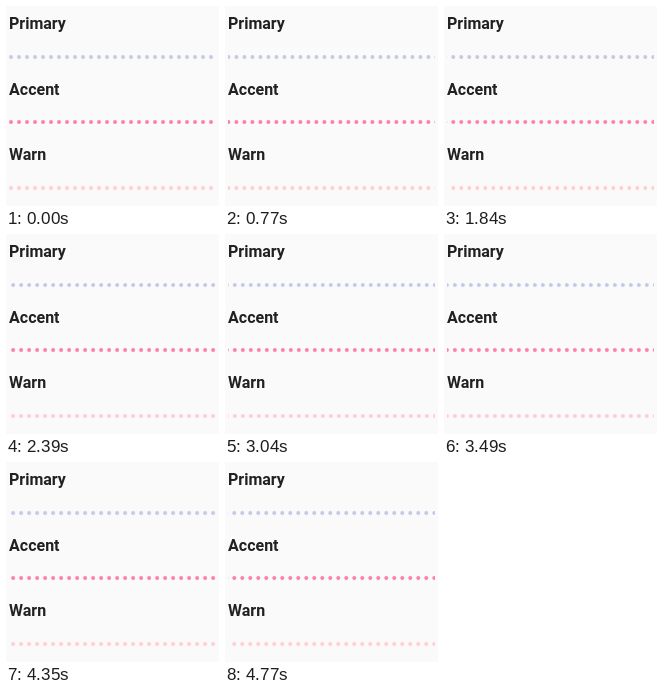
Write an HTML page that moves like this. It is 213x200 px and loops after 4790 ms.

```html
<!DOCTYPE html>
<html lang="en">
<head>
<meta charset="utf-8">
<title>Buffering progress bars</title>
<style>
  html, body { margin: 0; height: 100%; overflow: hidden; background: #fafafa; }
  svg { display: block; }
  body > svg { width: 100vw; height: 100vh; }
  text { font: 700 16px Roboto, sans-serif; fill: #212121; }
  line { stroke-width: 4; stroke-linecap: round; stroke-dasharray: 0 8; }
</style>
</head>
<body>
<svg viewBox="0 0 213 200">
  <text x="3" y="23">Primary</text>
  <text x="3" y="89">Accent</text>
  <text x="3" y="154">Warn</text>
  <!-- Nested svgs clip the dots to each bar -->
  <svg x="3" y="49" width="207" height="4"><line x1="-14" x2="230" y1="2" y2="2" stroke="#c5cae9"/></svg>
  <svg x="3" y="114" width="207" height="4"><line x1="-14" x2="230" y1="2" y2="2" stroke="#ff80ab"/></svg>
  <svg x="3" y="180" width="207" height="4"><line x1="-14" x2="230" y1="2" y2="2" stroke="#ffcdd2"/></svg>
</svg>
<script>
  const LOOP = 4790;             // ms
  const STEP = 32.67;            // ms between picture changes
  const SHIFT = 8 * 4 / 30;      // px per step: one 8px dot pitch in 7.5 steps
  const bars = document.querySelectorAll('line');

  function draw() {
    const time = performance.now() % LOOP;
    const step = Math.floor(time / STEP + 0.45);
    for (const bar of bars) bar.style.strokeDashoffset = (step * SHIFT) % 8;
    requestAnimationFrame(draw);
  }
  draw();
</script>
</body>
</html>
```
